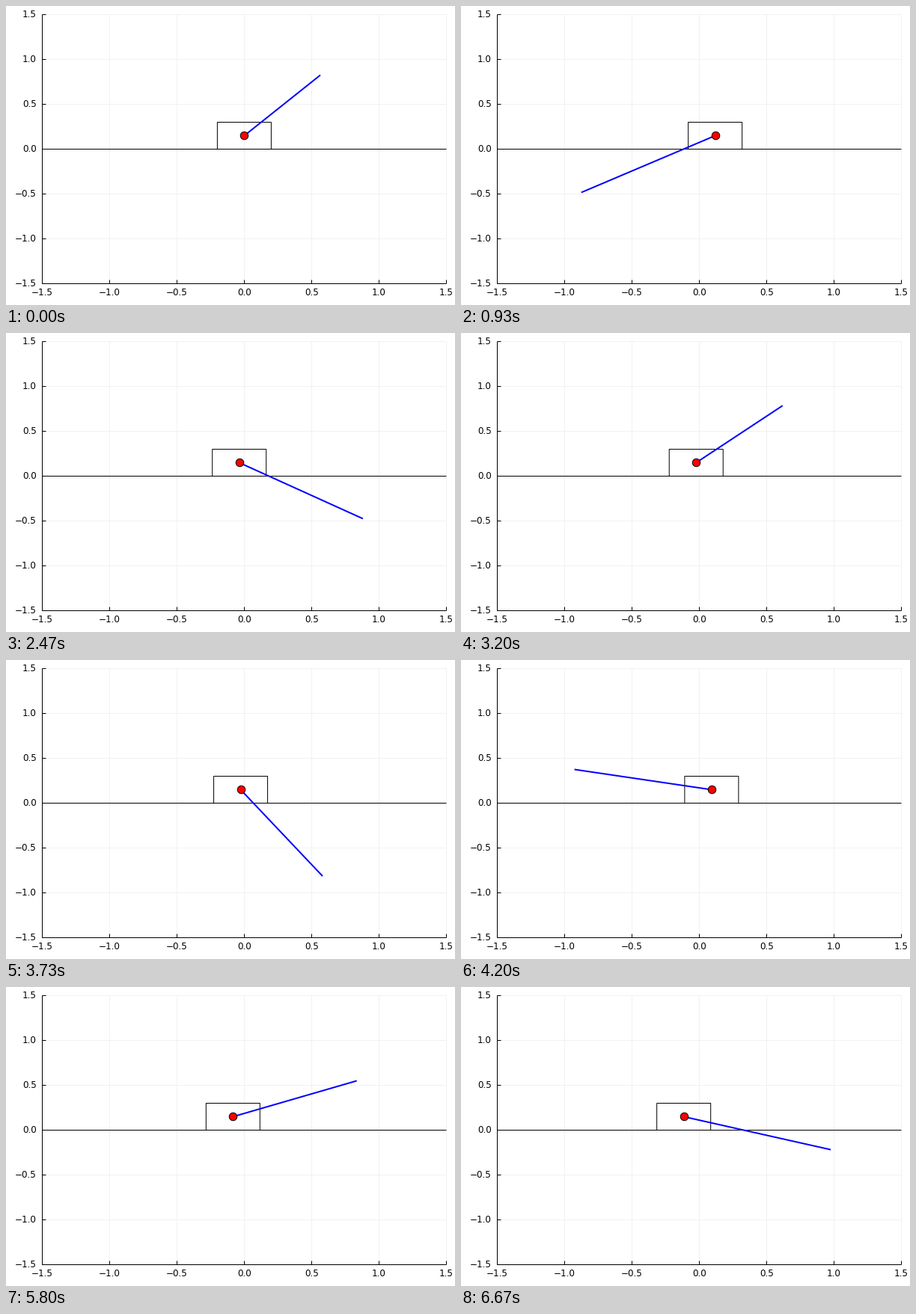
Recreate the animation shown at these times as a matplotlib script. Size 600 by 400 pixels, loop 6740 ms.

```python
import numpy as np
import matplotlib.pyplot as plt
from matplotlib.animation import FuncAnimation
from matplotlib.collections import LineCollection

W, H, DPI = 600, 400, 100
LIM = 1.5
LEFT, BOTTOM, AW, AH = 48.4, 28.52, 540, 360
PX = 72 / DPI                      # points per pixel
UX, UY = 2 * LIM / AW, 2 * LIM / AH  # data units per pixel

LOOP_MS, TICK_MS, FPS = 6740, 20, 15
STEPS = 101

MU = 0.083           # pole mass / total mass
GRAVITY = 0.05102    # per step squared, pole length 1
THETA0 = 0.6         # angle from upright
SPIN0 = 0.0007       # initial turn per step
PUSH = 8.1e-6        # slow drift of the cart


def accel(th, om):
    s, c = np.sin(th), np.cos(th)
    return (GRAVITY * s - MU * om ** 2 * s * c) / (1 - MU * c ** 2)


def simulate(sub=20):
    """Pole angle at every step, by RK4."""
    def rate(y):
        return np.array([y[1], accel(*y)])

    y, h = np.array([THETA0, SPIN0]), 1 / sub
    angles = [THETA0]
    for _ in range(STEPS - 1):
        for _ in range(sub):
            k1 = rate(y)
            k2 = rate(y + h / 2 * k1)
            k3 = rate(y + h / 2 * k2)
            k4 = rate(y + h * k3)
            y = y + h / 6 * (k1 + 2 * k2 + 2 * k3 + k4)
        angles.append(y[0])
    return np.array(angles)


theta = simulate()
cart_x = -MU * (np.sin(theta) - np.sin(THETA0)) - PUSH * np.arange(STEPS) ** 2

fig = plt.figure(figsize=(W / DPI, H / DPI), dpi=DPI, facecolor="white")
ax = fig.add_axes([LEFT / W, BOTTOM / H, AW / W, AH / H])
ax.set(xlim=(-LIM, LIM), ylim=(-LIM, LIM))
ax.axis("off")


def add_lines(segments, color, z):
    ax.add_collection(LineCollection(segments, colors=color, linewidths=PX,
                                     clip_on=False, zorder=z), autolim=False)


ticks = np.arange(-3, 4) / 2
grid, marks = [], []
for v in ticks:
    grid += [[(v, -LIM), (v, LIM)], [(-LIM, v), (LIM, v)]]
    marks += [[(v, -LIM), (v, -LIM + 5 * UY)], [(-LIM, v), (-LIM + 5 * UX, v)]]
    label = f"{v:.1f}".replace("-", "\u2212")
    style = dict(family="DejaVu Sans", size=12 * PX, va="baseline")
    ax.text(v, -LIM - 15.5 * UY, label, ha="center", **style)
    ax.text(-LIM - 7.5 * UX, v - 3.9 * UY, label, ha="right", **style)
axes_lines = [[(-LIM, -LIM), (LIM, -LIM)], [(-LIM, -LIM), (-LIM, LIM)]]
add_lines(grid, "#f1f1f1", 1)
add_lines(marks + axes_lines, "black", 2)
add_lines([[(-LIM, 0), (LIM, 0)]], "black", 3)

cart, = ax.plot([], [], color="black", lw=PX, solid_joinstyle="miter", zorder=4)
pole, = ax.plot([], [], color="blue", lw=2 * PX, solid_capstyle="butt", zorder=5)
hub, = ax.plot([], [], "o", mfc="red", mec="black", mew=PX, ms=10.5 * PX,
               zorder=6)
for part in (cart, pole, hub):
    part.set_snap(False)


def update(i):
    k = min(int((i * TICK_MS + 15) * FPS / 1000), STEPS - 1)
    x, th = cart_x[k], theta[k]
    cart.set_data(x + 0.2 * np.array([-1, 1, 1, -1, -1]), [0, 0, 0.3, 0.3, 0])
    pole.set_data([x, np.sin(th)], [0.15, np.cos(th)])
    hub.set_data([x], [0.15])
    return cart, pole, hub


anim = FuncAnimation(fig, update, frames=LOOP_MS // TICK_MS, interval=TICK_MS,
                     repeat=True, repeat_delay=0)
plt.show()
```
